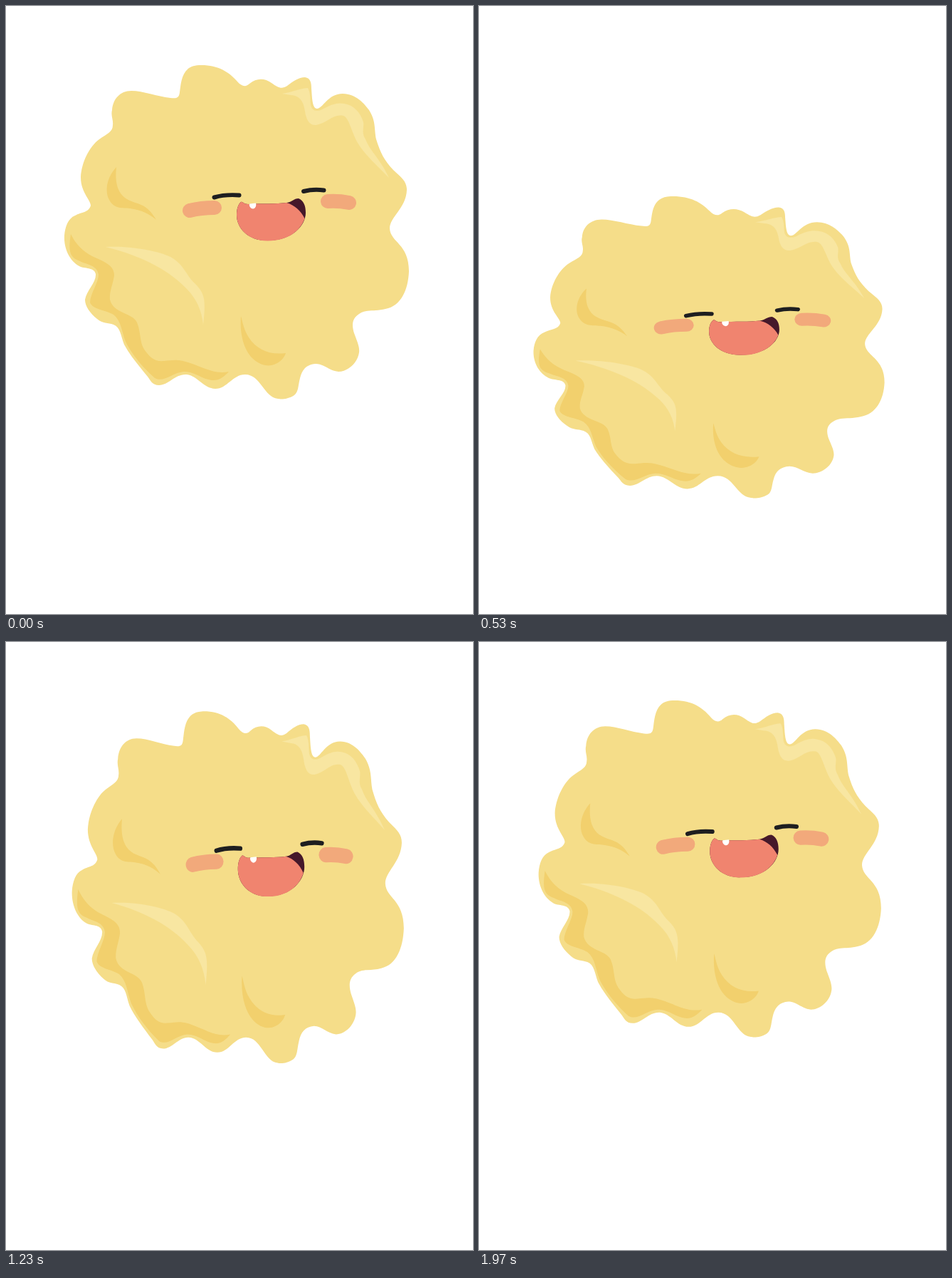
An HTML page that plays this animation: 656 by 853 pixels, repeating every 2010 ms.

```html
<!DOCTYPE html>
<html lang="en">
<head>
<meta charset="utf-8">
<title>Bouncing dough</title>
<style>
html, body { margin: 0; width: 100%; height: 100%; overflow: hidden; background: #fff; }
svg { display: block; width: 656px; height: 853px; }
.line { fill: none; stroke-linecap: round; }
</style>
</head>
<body>
<svg viewBox="0 0 656 853">
<g id="dough">
  <path fill="#f5dd89" d="M271 83C297 82 313 92 325 106C331 113 337 114 342 109C352 101 363 101 373 108C383 115 387 117 395 112C403 106 411 100 420 100C428 101 429 108 429 116C430 128 430 144 437 144C445 144 452 123 473 123C492 123 504 138 510 146C520 162 517 172 520 187C526 206 531 216 544 230C556 241 563 246 563 258C562 284 539 296 539 312C540 332 566 333 566 372C565 398 555 421 533 425C518 429 506 425 496 432C485 439 486 449 489 459C493 470 497 478 496 486C494 501 480 513 467 513C454 512 447 502 435 502C422 503 416 510 413 522C410 534 411 541 405 546C396 552 386 552 382 551C362 549 358 517 336 517C318 517 311 537 294 537C277 537 268 517 252 517C237 517 228 532 215 532C205 532 203 525 199 520C186 504 174 490 166 475C161 462 161 451 151 447C143 444 136 446 128 439C118 431 111 421 111 412C113 399 127 388 126 376C124 366 110 369 103 365C88 357 81 338 82 322C83 310 87 298 97 294C106 289 116 290 119 280C119 272 105 262 105 240C106 220 117 197 131 187C142 179 150 177 150 167C151 160 147 154 149 146C150 131 160 119 176 119C193 119 212 127 231 129C240 130 243 129 244 121C246 108 246 84 271 83Z"/>
  <g fill="#f2d06d">
    <path d="M91 320C101 340 115 349 130 355C145 362 152 367 152 378C150 392 145 400 146 412C151 432 178 430 184 444C190 458 187 472 195 483C203 494 209 499 222 498C234 497 240 495 256 500C278 507 292 517 313 513C306 520 300 526 289 525C274 523 266 513 250 513C234 514 222 529 209 522C192 507 177 489 168 471C162 455 162 442 151 433C139 426 122 426 118 416C118 404 130 388 130 377C128 363 113 363 104 358C90 353 87 346 91 320Z"/>
    <path d="M155 226C140 242 139 262 145 272C152 285 163 283 174 284C190 286 202 292 211 300C204 288 197 281 185 277C172 273 162 269 157 255C154 246 154 236 155 226Z"/>
    <path d="M330 435C328 460 334 482 346 494C356 504 369 507 379 502C386 499 391 493 393 487C370 490 352 482 341 465C334 454 333 446 330 435Z"/>
  </g>
  <g fill="#f8e6a1">
    <path d="M140 338C176 336 215 344 231 352C252 364 252 378 267 391C279 404 281 412 277 447C275 427 267 409 252 395C226 368 185 349 140 338Z"/>
    <path d="M388 123C402 121 415 115 424 115C428 122 427 131 428 139C430 148 438 149 446 144C457 138 466 135 475 137C489 139 498 150 502 163C503 172 499 178 505 187C512 205 524 212 538 241C520 222 505 210 494 192C485 176 482 157 474 154C459 151 452 164 436 167C426 168 423 160 421 153C419 142 418 126 400 125Z"/>
  </g>
  <path class="line" stroke="#f2a97b" stroke-width="20" d="M258 287Q274 283 293 283M452 274Q467 273 482 276"/>
  <path class="line" stroke="#1e1e20" stroke-width="6" d="M292.5 268.5Q308 264 327.5 265.5M418 260Q432 256.5 446.5 258.5"/>
  <path fill="#45182a" d="M330 275C333 274 333 278 340 278C360 277 380 278 394 276C402 275 404 270 411 270C418 273 421 280 421 290C421 308 402 329 368 329C342 330 324 313 324 293C324 285 326 278 330 275Z"/>
  <path fill="#f0846f" d="M330 275C333 274 333 278 340 278C360 277 380 278 394 276C405 279 414 287 419.5 298C414 315 396 329.5 368 329.5C342 330 324 313 324 293C324 285 326 278 330 275Z"/>
  <path fill="#fff" d="M342 277.5C341 281 344 284.5 347 284.5C350 284 352 281 351 276.5Z"/>
</g>
</svg>
<script>
const dough = document.getElementById('dough');
const LOOP = 2010, STEPS = 60, BOUNCE = 28;
const PIVOT = 372, REST = 552;

// step, bottom edge, height scale, width scale
const keys = [
  [0, 552, 1, 1],
  [3, 555, 1.0085, 0.994],
  [9, 591.5, 1.0535, 0.963],
  [11, 628, 1.0766, 0.9526],
  [14, 719, 0.85, 1.041],
  [16, 691, 0.904, 1.0186],
  [20, 590, 1.104, 0.94],
  [21, 577, 1.084, 0.946],
  [25, 556, 1.0234, 0.9835],
  [28, 552, 1, 1]
];

// Tangent at key i: flat at turning points, weighted mean elsewhere
function slope(i, c) {
  if (i === 0 || i === keys.length - 1) return 0;
  const [a, b, d] = keys.slice(i - 1, i + 2);
  const h0 = b[0] - a[0], h1 = d[0] - b[0];
  const s0 = (b[c] - a[c]) / h0, s1 = (d[c] - b[c]) / h1;
  return s0 * s1 <= 0 ? 0 : (s0 * h1 + s1 * h0) / (h0 + h1);
}

function valueAt(step, c) {
  const i = keys.findIndex(k => k[0] > step) - 1;
  const a = keys[i], b = keys[i + 1], h = b[0] - a[0];
  const u = (step - a[0]) / h, v = 1 - u;
  return a[c] * v * v * (1 + 2 * u) + b[c] * u * u * (3 - 2 * u)
    + h * u * v * (slope(i, c) * v - slope(i + 1, c) * u);
}

function draw() {
  const t = performance.now() % LOOP;
  const step = Math.min(STEPS - 1, Math.floor((t + 5) * 0.03)) % BOUNCE;
  const [bottom, sy, sx] = [1, 2, 3].map(c => valueAt(step, c));
  dough.setAttribute('transform',
    `matrix(${sx} 0 0 ${sy} ${PIVOT * (1 - sx)} ${bottom - REST * sy})`);
  requestAnimationFrame(draw);
}
draw();
</script>
</body>
</html>
```
